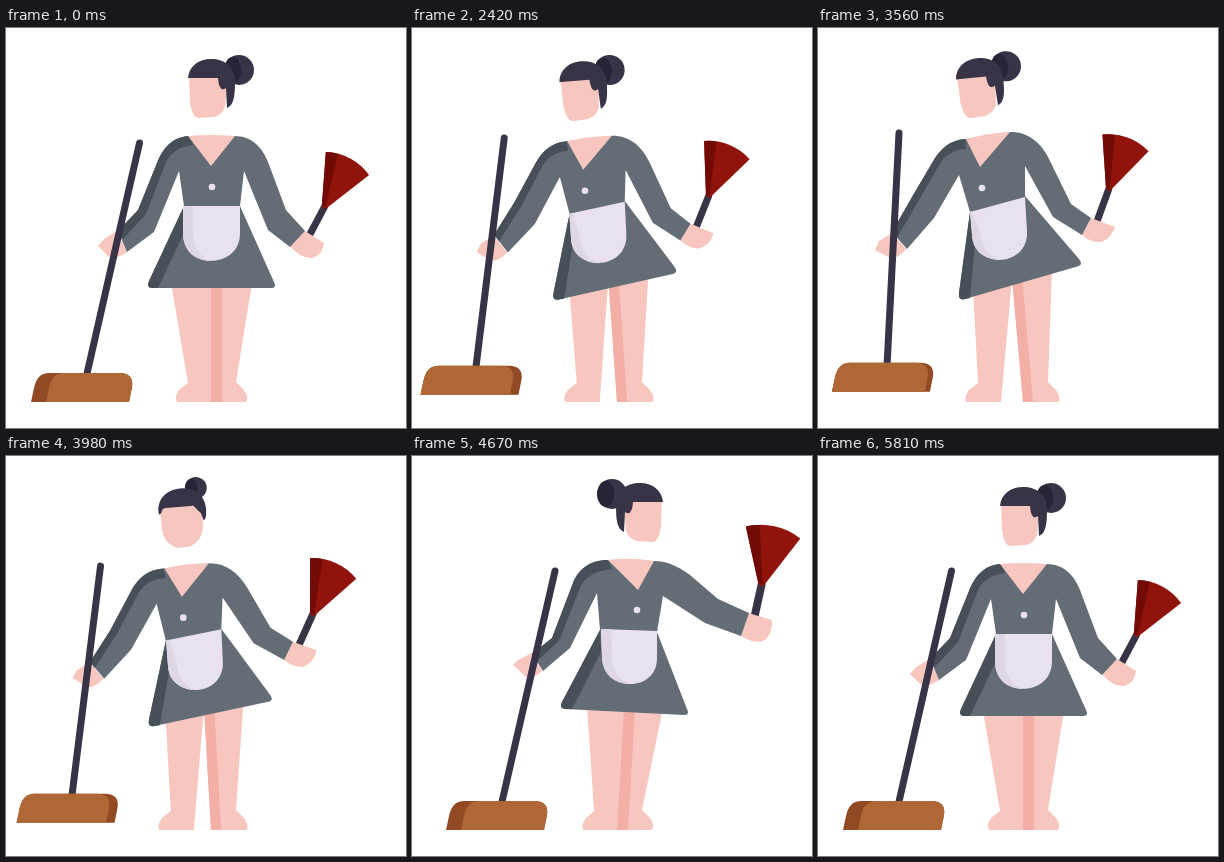
An HTML page with a canvas that plays this animation: 400x400 px, repeating every 5.84 s.

```html
<!DOCTYPE html>
<html>
<head>
<meta charset="utf-8">
<style>
html, body { margin: 0; overflow: hidden; background: #fff; }
canvas { display: block; }
</style>
</head>
<body>
<canvas id="stage" width="400" height="400"></canvas>
<script>
const ctx = document.getElementById('stage').getContext('2d');
const LOOP = 5840;
const REST = 0, LEFT = 1, RIGHT = 2;

// [start, end, from pose, to pose]
const moves = [
  [2000, 2600, REST, LEFT],
  [3800, 4400, LEFT, RIGHT],
  [5200, 5800, RIGHT, REST]
];

const color = {
  dress: '#646d76', dressDark: '#475059', skin: '#f7c7bf', skinDark: '#f3aea6',
  hair: '#393347', hairDark: '#282336', broom: '#af6835', broomDark: '#914a23',
  duster: '#90130c', dusterDark: '#720a06', apron: '#e9e1ee', apronDark: '#dfd6e3'
};

// Every shape is given in the poses rest, left, right
const legs = [
  [color.skin, [
    'M165 255L205 255L205 374L171 374Q168 369 173 362L182 355Z',
    'M155 260L194 250L183 374L148 374Q146 369 151 362L160 355Z',
    'M175 250L213 250L205 374L171 374Q169 369 174 362L182 355Z']],
  [color.skin, [
    'M205 255L246 255L230 354L238 362Q243 369 240 374L205 374Z',
    'M194 250L234 240L230 354L238 362Q243 369 241 374L205 374Z',
    'M212 250L251 252L230 354L238 362Q243 369 240 374L205 374Z']],
  [color.skinDark, [
    'M205 255L216 255L216 374L205 374Z',
    'M194 250L204 248L215 374L205 374Z',
    'M212 250L223 252L216 374L205 374Z']]
];

const hands = [
  [color.skin, [
    'M111 203L121 224Q112 231 103 229L92 218L98 211Z',
    'M74 205L88 221Q80 231 72 230L57 222L61 213Z',
    'M120 197L130 215Q122 223 114 221L101 209L106 204Z']],
  [color.skin, [
    'M299 203L318 215Q317 227 306 230Q295 231 284 218Z',
    'M273 190L297 199Q293 211 283 214Q273 215 264 207Z',
    'M336 157L360 164Q361 177 353 184Q344 189 329 180Z']]
];

const clothes = [
  [color.dress, [
    'M183 108C165 109 156 122 151 135L132 182L112 203L121 224L148 204L173 143L178 178L143 253Q140 260 146 260L265 260Q271 260 268 254L234 178L238 143L262 202L284 219L299 203L280 182L262 134C256 119 246 108 228 108Z',
    'M147 111C132 112 123 121 117 130L94 169L74 204L89 221L116 190L141 147L152 184L141 265Q140 273 147 271L261 238Q265 236 261 231L207 168L207 138L235 189L264 207L273 190L253 176L232 133C223 114 210 104 193 104Z',
    'M196 104C177 104 166 114 161 127L140 182L120 198L131 215L158 192L185 137L188 174L150 246Q147 252 153 253L272 259Q278 259 275 253L245 176L251 140L293 167L329 180L337 157L306 143L278 119C264 109 254 105 242 105Z']],
  [color.dressDark, [
    'M183 108C165 109 156 122 151 135L132 182L112 203L117 211L140 186L159 137C163 125 172 119 187 117Z',
    'M147 111C132 112 123 121 117 130L94 169L74 204L79 210L101 172L123 134C130 125 138 121 148 121Z',
    'M196 104C177 104 166 114 161 127L140 182L120 198L124 206L147 185L168 132C173 121 182 115 200 113Z']],
  [color.dressDark, [
    'M178 178L143 253Q140 260 146 260L152 260L178 205Z',
    'M152 184L141 265Q140 273 147 271L152 270L158 205Z',
    'M188 174L150 246Q147 252 153 253L160 253L189 196Z']],
  [color.skin, [
    'M182 108Q205 106 229 108L205 138Z',
    'M148 111Q170 105 192 104L162 139Z',
    'M196 104Q218 101 242 105L226 134Z']],
  [color.apron, [
    'M177 178L234 178L234 205C234 242 177 242 177 205Z',
    'M152 184L207 169L209 203C211 240 155 242 154 206Z',
    'M189 173L245 175L245 202C245 238 190 236 190 200Z']],
  [color.apronDark, [
    'M177 178L187 178L187 205C187 220 195 230 205 233C190 233 177 224 177 205Z',
    'M152 184L154 183L162 205C164 220 172 229 183 232C167 231 154 224 154 206Z',
    'M189 173L199 173L200 200C200 215 208 225 218 228C203 228 190 219 190 200Z']]
];

// Head shapes are relative to the head centre, facing left, front, right
const FRONT = 1;
const head = [
  [color.skin, [
    'M-23 -15L-22 14Q-20 29 -14 30L2 29Q10 27 13 19L16 -15Z',
    'M-22 -14L-22 10Q-20 24 -6 30L6 30Q20 24 22 10L22 -14Z',
    'M-16 -15L-13 19Q-10 27 -2 29L14 30Q20 29 22 14L23 -15Z']],
  [color.hair, [
    'M-24 -10C-24 -10 -24 -10 -24 -10C-23 -22 -13 -29 -1 -29C13 -29 23 -21 23 -7C23 8 22 17 15 20L14 0Q7 5 6 -10L-22 -10Q-23 -10 -24 -10Z',
    'M-23 -2C-24 -4 -24 -6 -24 -8C-23 -22 -13 -29 0 -29C13 -29 23 -22 24 -8C24 -6 24 -4 23 -2L20 -4Q19 -11 14 -11L-14 -11Q-19 -11 -20 -4Z',
    'M-15 20C-22 17 -23 8 -23 -7C-23 -21 -13 -29 1 -29C13 -29 23 -22 24 -10C24 -10 24 -10 24 -10L24 -10Q23 -10 22 -10L-6 -10Q-7 5 -14 0Z']]
];

const lerp = (a, b, k) => a + (b - a) * k;
const clamp = x => Math.min(1, Math.max(0, x));
const ease = x => x * x * (3 - 2 * x);
const wave = (time, period) => (1 - Math.cos(2 * Math.PI * time / period)) / 2;

// The upper body dips between poses
function poseAt(t) {
  let pose = { from: REST, to: REST, k: 0, dip: 0 };
  for (const [start, end, from, to] of moves) {
    if (t < start) break;
    const u = clamp((t - start) / (end - start));
    pose = { from, to, k: ease(u), dip: 14 * u * (1 - u) };
  }
  return pose;
}

const mix = (pose, ...values) => lerp(values[pose.from], values[pose.to], pose.k);

function mixPath(pose, paths) {
  const target = paths[pose.to].match(/-?[\d.]+/g);
  let i = 0;
  return paths[pose.from].replace(/-?[\d.]+/g, n => lerp(+n, +target[i++], pose.k).toFixed(2));
}

function fill(path, style) {
  ctx.fillStyle = style;
  ctx.fill(new Path2D(path));
}

function drawShapes(shapes, pose) {
  for (const [style, paths] of shapes) fill(mixPath(pose, paths), style);
}

function ellipse(x, y, rx, ry, style) {
  ctx.fillStyle = style;
  ctx.beginPath();
  ctx.ellipse(x, y, rx, ry, 0, 0, 2 * Math.PI);
  ctx.fill();
}

function line(x1, y1, x2, y2, width) {
  ctx.strokeStyle = color.hair;
  ctx.lineWidth = width;
  ctx.lineCap = 'round';
  ctx.beginPath();
  ctx.moveTo(x1, y1);
  ctx.lineTo(x2, y2);
  ctx.stroke();
}

function at(x, y, degrees, draw) {
  ctx.save();
  ctx.translate(x, y);
  ctx.rotate(degrees * Math.PI / 180);
  draw();
  ctx.restore();
}

function drawHead(pose) {
  const turn = mix(pose, 1, 1, -1);
  const facing = { from: FRONT, to: turn > 0 ? 0 : 2, k: turn * turn };
  at(mix(pose, 206, 163, 227), mix(pose, 60, 59, 56), mix(pose, 0, -6, 0), () => {
    const x = 27 * turn, y = lerp(-33, -18, facing.k), r = lerp(9, 15, facing.k);
    ellipse(x, y, r, r, color.hair);
    ellipse(x - 0.42 * r, y, 0.57 * r, 0.86 * r, color.hairDark);
    drawShapes(head, facing);
  });
}

function dusterAngle(t, pose) {
  if (t < 4400) return mix(pose, 28, 20, 39);
  if (t < 5400) return 39 - 27 * wave(t - 4400, 500);
  return lerp(39, 28, ease(clamp((t - 5400) / 400)));
}

function drawDuster(t, pose) {
  at(mix(pose, 303, 279.5, 342), mix(pose, 208, 192, 163), dusterAngle(t, pose), () => {
    ctx.scale(mix(pose, 1, 1, 1.14), mix(pose, 1, 1, 1.08));
    line(0, 0, 0, -33, 7);
    fill('M-3 -33L-24.5 -82A54 54 0 0 1 24.5 -82L2 -32Q0 -30 -3 -33Z', color.duster);
    fill('M-3 -33L-24.5 -82Q-19 -85 -13 -86L1 -33Z', color.dusterDark);
  });
}

function broomHead(left, right) {
  return `M${left} 0L${left + 3} -14Q${left + 6} -29 ${left + 18} -29` +
    `L${90 - right} -29Q${103 - right} -28 ${101 - right} -15L${98 - right} 0Z`;
}

function drawBroom(t, pose) {
  const sweep = t > 2600 && t < 3800 ? wave(t - 2600, 600) : 0;
  const x = mix(pose, 25, 4, 34) + 11 * sweep;
  const y = Math.min(374, mix(pose, 374, 361, 374) + pose.dip + 3 * sweep);
  const band = mix(pose, 15, -15, 15) + 11 * sweep;
  line(x + 55, y - 24, mix(pose, 133.5, 81, 143), mix(pose, 115, 105, 115) + pose.dip, 7);
  at(x, y, 0, () => {
    fill(broomHead(0, 0), color.broomDark);
    fill(broomHead(Math.max(0, band), Math.max(0, -band)), color.broom);
  });
}

function draw(t) {
  const pose = poseAt(t);
  ctx.fillStyle = '#fff';
  ctx.fillRect(0, 0, 400, 400);
  drawShapes(legs, pose);
  at(0, pose.dip, 0, () => {
    drawDuster(t, pose);
    drawShapes(hands, pose);
    drawShapes(clothes, pose);
    ellipse(mix(pose, 206, 164, 225), mix(pose, 159, 160, 154), 3.3, 3.3, color.apron);
    drawHead(pose);
  });
  drawBroom(t, pose);
}

const begin = performance.now();
function tick() {
  draw((performance.now() - begin) % LOOP);
  requestAnimationFrame(tick);
}
tick();
</script>
</body>
</html>
```
